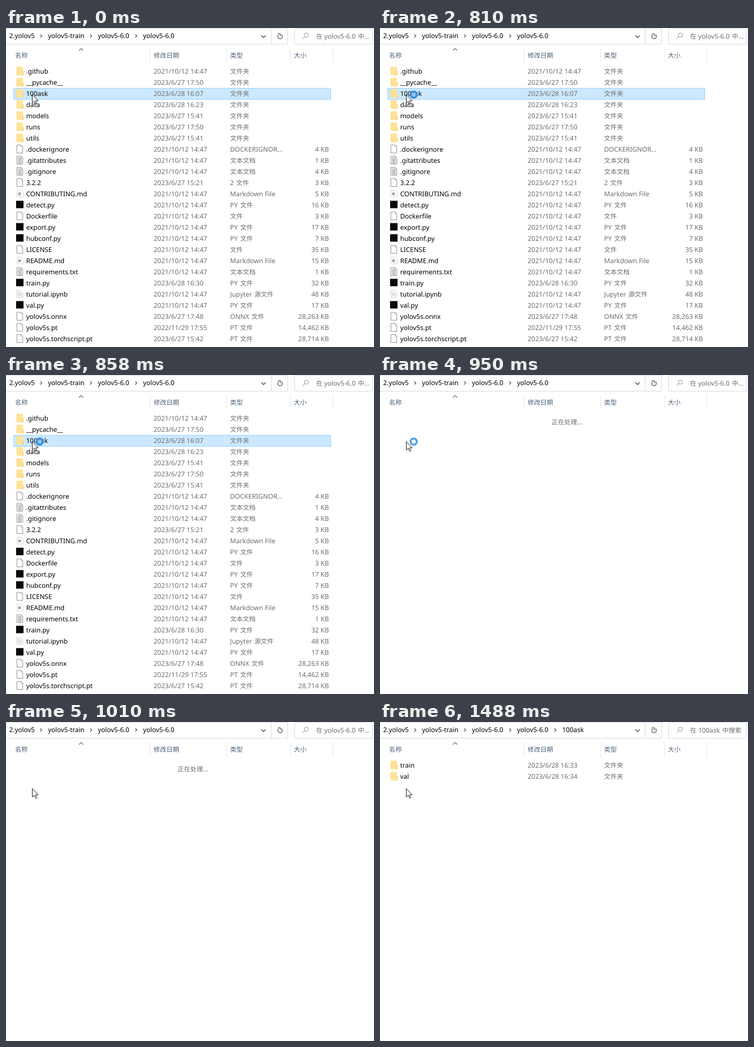
Recreate the animation shown at these times as an HTML page. Size 693 by 601 pixels, loop 1.76 s.

```html
<!DOCTYPE html>
<html lang="zh-CN">
<head>
<meta charset="utf-8">
<style>
  html, body { margin: 0; width: 100%; height: 100%; overflow: hidden; background: #fff; }
  svg { display: block; }
  text {
    font: 12.4px "Noto Sans", "Noto Sans CJK SC", "Noto Sans CJK", sans-serif;
    text-rendering: geometricPrecision;
    white-space: pre;
  }
  .cjk { font: 12px "Noto Sans CJK SC", "Noto Sans CJK", sans-serif; }
</style>
</head>
<body>
<svg width="693" height="601" viewBox="0 0 693 601" fill="none">
  <defs>
    <g id="folder">
      <path d="M0 0h12v8h1v8H0z" fill="#ffe296"/>
      <path d="M.5 0v16" stroke="#fbd979"/>
      <path d="M11.500 8.500h1v7H10" stroke="#f0c95c"/>
    </g>
    <g id="file">
      <path d="M.5 .5h8l3 3v12h-11z" fill="#fff" stroke="#8e8e8e"/>
      <path d="M8.500 .5v3h3" stroke="#a8a8a8"/>
    </g>
    <g id="text">
      <use href="#file"/>
      <path d="M2.500 3.500h5M2.500 5.500h7m-7 2h7m-7 2h7m-7 2h7m-7 2h7" stroke="#8f8f8f"/>
    </g>
    <g id="markdown">
      <path d="M.5 1.500h9l3 3v10h-12z" fill="#fafafa" stroke="#dcdcdc"/>
      <rect x="3" y="6" width="5" height="5" fill="#a6a6a6"/>
    </g>
    <g id="notebook">
      <path d="M.5 1.500h8l3 3v10h-11z" fill="#fff" stroke="#c9c9c9"/>
      <path d="M2.500 5.500h5m-5 2h7m-7 2h7m-7 2h6" stroke="#c4c9bd"/>
    </g>
    <rect id="python" x="-1" y=".5" width="14" height="14" fill="#090a06"/>
  </defs>

  <g id="bar">
    <path d="M0 .5H530.500V30.500H0M499.500 .5v30M543.500 .5h147v30h-147z" stroke="#d9d9d9"/>
    <path d="M481 14l4 4 4-4" stroke="#555" stroke-width="1.700"/>
    <path d="M513.300 12.700A4.300 4.300 0 1 0 518.500 12.400" stroke="#666" stroke-width="1.500"/>
    <path d="M512 11h4.500v4.500" stroke="#666" stroke-width="1.400"/>
    <circle cx="565.700" cy="13.500" r="3.900" stroke="#858b93"/>
    <path d="M562.800 16.300l-4.500 4.200" stroke="#858b93"/>
  </g>
  <g id="header">
    <path d="M271.500 38v27m144-27v27m120-27v27m80-27v27" stroke="#e5e5e5"/>
    <path d="M137.500 42.500l4-4 4 4" stroke="#666" stroke-width="1.200"/>
  </g>
  <g id="parent">
    <rect x="14.500" y="113.500" width="597" height="21" fill="#cce8ff" stroke="#99d1ff"/>
  </g>
  <g id="child"></g>
  <g id="busyText"></g>
  <g id="searchParent"></g>
  <path d="M49.500 125.500v16l3.700-3.500 2.600 5.700 2.300-1-2.500-5.500h5z" fill="#fff" stroke="#111"/>
  <g id="spinner">
    <circle id="ring" cx="63.500" cy="125.500" r="5.800" stroke-width="4"/>
  </g>
</svg>
<script>
const NS = 'http://www.w3.org/2000/svg';
const $ = id => document.getElementById(id);
const INK = '#000', GREY = '#6d6d6d', SLATE = '#4c607a';

function add(parent, tag, attrs) {
  const node = document.createElementNS(NS, tag);
  for (const key in attrs) node.setAttribute(key, attrs[key]);
  return parent.appendChild(node);
}

// Chinese runs are slightly smaller than Latin runs, with a small gap before them.
function label(parent, x, y, words, fill, anchor = 'start') {
  const text = add(parent, 'text', { x, y, fill, 'text-anchor': anchor });
  words.match(/[\u4e00-\u9fff]+|[^\u4e00-\u9fff]+/g).forEach((run, i) => {
    const chinese = /[\u4e00-\u9fff]/.test(run);
    const span = add(text, 'tspan', chinese ? { class: 'cjk', dx: i ? 1.2 : 0 } : {});
    span.textContent = run;
  });
}

function chevron(parent, x) {
  add(parent, 'path', { d: `M${x - 1.5} 12l3 3-3 3`, stroke: '#555', 'stroke-width': 1.3 });
}

function row(parent, index, [icon, name, date, type, size]) {
  const y = 86 + 21 * index;
  add(parent, 'use', { href: '#' + icon, x: 20, y: y - 13 });
  label(parent, 38, y, name, INK);
  label(parent, 278, y, date, GREY);
  label(parent, 422, y, type, GREY);
  if (size) label(parent, 608, y, size + ' KB', GREY, 'end');
}

const RELEASE = '2021/10/12 14:47';
const folder = (name, date) => ['folder', name, date, '文件夹'];
const python = (name, size, date = RELEASE) => ['python', name, date, 'PY 文件', size];
const textFile = (name, size) => ['text', name, RELEASE, '文本文档', size];
const markdown = (name, size) => ['markdown', name, RELEASE, 'Markdown File', size];
const file = (name, type, size, date = RELEASE) => ['file', name, date, type, size];

[
  folder('.github', RELEASE),
  folder('__pycache__', '2023/6/27 17:50'),
  folder('100ask', '2023/6/28 16:07'),
  folder('data', '2023/6/28 16:23'),
  folder('models', '2023/6/27 15:41'),
  folder('runs', '2023/6/27 17:50'),
  folder('utils', '2023/6/27 15:41'),
  file('.dockerignore', 'DOCKERIGNOR...', '4'),
  textFile('.gitattributes', '1'),
  textFile('.gitignore', '4'),
  file('3.2.2', '2 文件', '3', '2023/6/27 15:21'),
  markdown('CONTRIBUTING.md', '5'),
  python('detect.py', '16'),
  file('Dockerfile', '文件', '3'),
  python('export.py', '17'),
  python('hubconf.py', '7'),
  file('LICENSE', '文件', '35'),
  markdown('README.md', '15'),
  textFile('requirements.txt', '1'),
  python('train.py', '32', '2023/6/28 16:30'),
  ['notebook', 'tutorial.ipynb', RELEASE, 'Jupyter 源文件', '48'],
  python('val.py', '17'),
  file('yolov5s.onnx', 'ONNX 文件', '28,263', '2023/6/27 17:48'),
  file('yolov5s.pt', 'PT 文件', '14,462', '2022/11/29 17:55'),
  file('yolov5s.torchscript.pt', 'PT 文件', '28,714', '2023/6/27 15:42'),
].forEach((entry, i) => row($('parent'), i, entry));

[folder('train', '2023/6/28 16:33'), folder('val', '2023/6/28 16:34')]
  .forEach((entry, i) => row($('child'), i, entry));

[[6, '2.yolov5'], [79, 'yolov5-train'], [173, 'yolov5-6.0'], [258, 'yolov5-6.0']]
  .forEach(([x, name]) => label($('bar'), x, 19, name, INK));
[66, 160, 245].forEach(x => chevron($('bar'), x));
chevron($('child'), 330);
label($('child'), 343, 19, '100ask', INK);
label($('child'), 584, 20, '在 100ask 中搜索', GREY);
label($('searchParent'), 584, 20, '在 yolov5-6.0 中...', GREY);
label($('busyText'), 323, 93, '正在处理...', GREY);
[[17, '名称'], [278, '修改日期'], [422, '类型'], [542, '大小']]
  .forEach(([x, name]) => label($('header'), x, 56, name, SLATE));

// Each stage: end time, visible groups, spinner ring and centre colours.
const stages = [
  [810, 'searchParent header parent'],
  [890, 'searchParent header parent spinner', '#3d8fd8', '#8fc6f0'],
  [950, 'searchParent spinner', '#6aaee8', '#fff'],
  [1010, 'searchParent header busyText spinner', '#4fa6e8', '#fff'],
  [1080, 'searchParent header busyText'],
  [1760, 'header child'],
];
const groups = ['searchParent', 'header', 'parent', 'child', 'busyText', 'spinner'];

function draw() {
  const time = performance.now() % 1760;
  const [, visible, ring, centre] = stages.find(([end]) => time < end);
  const shown = visible.split(' ');
  for (const id of groups) $(id).style.display = shown.includes(id) ? '' : 'none';
  if (ring) {
    $('ring').setAttribute('stroke', ring);
    $('ring').setAttribute('fill', centre);
  }
  requestAnimationFrame(draw);
}
draw();
</script>
</body>
</html>
```
